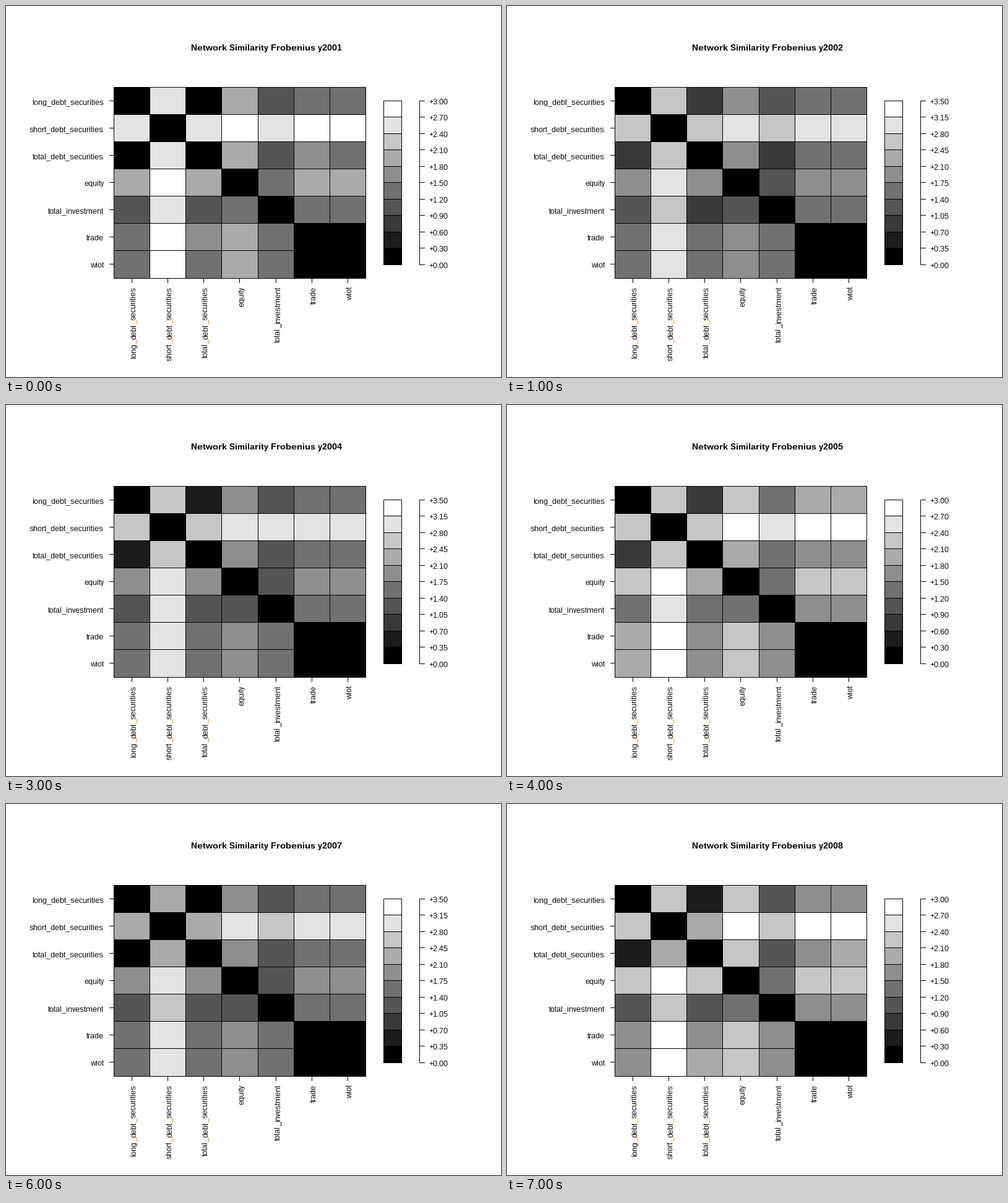
Animation of 800x600 px, one loop 8000 ms. Source, as a matplotlib script:

```python
import numpy as np
import matplotlib.pyplot as plt
from matplotlib.animation import FuncAnimation
from matplotlib.patches import Rectangle

plt.rcParams.update({
    "font.family": "Liberation Sans",
    "text.hinting": "native",
    "text.hinting_factor": 1,
})

W, H, DPI = 800, 600, 96
PX = 72 / DPI
YEARS = 8
ORANGE = "#f0962d"
NAMES = ["long_debt_securities", "short_debt_securities",
         "total_debt_securities", "equity", "total_investment",
         "trade", "wiot"]
N = len(NAMES)
LONG, SHORT, TOTAL, EQUITY, INVEST, TRADE, WIOT = range(N)


def distances(n):
    """Distance between each pair of networks, n years after the start."""
    wave = np.cos(2 * np.pi * (n - 1) / 3)
    hump = np.sin(np.pi * n / (YEARS - 1))
    gap = max(0, .717 - .05 * n + .31 * np.cos(np.pi * (n - 2.5) / 3)
              - .267 * np.cos(2 * np.pi * n / 3))
    far = 3.05 - .08 * np.cos(4 * np.pi * (n - .25) / 7)
    short = 2.62 - .04 * n - .1 * wave
    equity = 1.93 + .03 * n + .1 * wave
    invest = 1 + .3 * hump
    trade = 1.45 + .22 * hump + .15 * wave

    d = np.zeros((N, N))
    d[SHORT, [EQUITY, TRADE, WIOT]] = far
    d[EQUITY, [LONG, TRADE, WIOT]] = equity
    d[EQUITY, TOTAL] = equity - .06
    d[EQUITY, INVEST] = 1.3
    d[LONG, TOTAL] = gap
    d[LONG, SHORT] = short
    d[LONG, INVEST] = invest
    d[LONG, [TRADE, WIOT]] = trade
    d[TOTAL, SHORT] = short - .025 * n
    d[TOTAL, INVEST] = invest - .11 * gap
    d[TOTAL, TRADE] = 1.6
    d[TOTAL, WIOT] = 1.45 + .04 * n + .08 * wave
    d[INVEST, SHORT] = short + .265 * hump
    d[INVEST, [TRADE, WIOT]] = 1.45 + .04 * n
    return d + d.T


fig = plt.figure(figsize=(W / DPI, H / DPI), dpi=DPI, facecolor="white")
ax = fig.add_axes([0, 0, 1, 1])
ax.set(xlim=(0, W), ylim=(H, 0))
ax.axis("off")


def grey(level):
    return str(level / 9)


def box(x0, y0, x1, y1, level=0):
    return ax.add_patch(Rectangle(
        (x0 + .5, y0 + .5), x1 - x0, y1 - y0, fc=grey(level), ec="black",
        lw=PX, joinstyle="miter", snap=False))


def line(x0, y0, x1, y1, color="black"):
    ax.plot([x0 + .5, x1 + .5], [y0 + .5, y1 + .5], color=color, lw=PX,
            solid_capstyle="projecting", snap=False)


def label(x, y, text, size=12, **kw):
    return ax.text(x, y, text, fontsize=size * PX, va="baseline", **kw)


def upright(x, top, name, color):
    """Label reading upwards, built down from its last word."""
    renderer = fig.canvas.get_renderer()
    words = name.split("_")
    for k, word in enumerate(reversed(words)):
        t = label(x, top, word, rotation=90, rotation_mode="anchor",
                  ha="right")
        top += round(t.get_window_extent(renderer).height)
        if k < len(words) - 1:
            line(x + 1, top, x + 1, top + 6, color)
            top += 7


# Matrix
steps = np.arange(N + 1)
xs = np.floor(174 + 407 / N * steps + .49)
ys = np.floor(131 + 309 / N * steps + .01)
cells = {(i, j): box(xs[j], ys[i], xs[j + 1], ys[i + 1])
         for i in range(N) for j in range(N)}

for i, name in enumerate(NAMES):
    x = np.floor(174 + 407 / N * (i + .5) + .49)
    y = np.floor(131 + 309 / N * (i + .5))
    line(167, y, 174, y)
    line(x, 440, x, 447)
    label(158, y + 6, name, ha="right")
    upright(x + 7, 454, name, ORANGE if "debt" in name else "black")

# Colour key
key_y = np.floor(418 - 26.5 * np.arange(11))
for k in range(10):
    box(610, key_y[k + 1], 639, key_y[k], k)
line(668, key_y[-1], 668, key_y[0])
for y in key_y:
    line(668, y, 676, y)
key_text = [label(683, y + 6, "", ha="left") for y in key_y]

title = label(421, 72, "", 14.4, ha="center", weight="bold")


def update(n):
    d = distances(n)
    scale = np.ceil(2 * d.max()) / 2
    title.set_text(f"Network Similarity Frobenius y{2001 + n}")
    for pos, cell in cells.items():
        cell.set_facecolor(grey(int(10 * d[pos] / scale)))
    for k, t in enumerate(key_text):
        t.set_text(f"{scale * k / 10:+.2f}")
    return [title, *cells.values(), *key_text]


anim = FuncAnimation(fig, update, frames=YEARS, interval=1000,
                     repeat=True, repeat_delay=0, blit=False)
plt.show()
```
